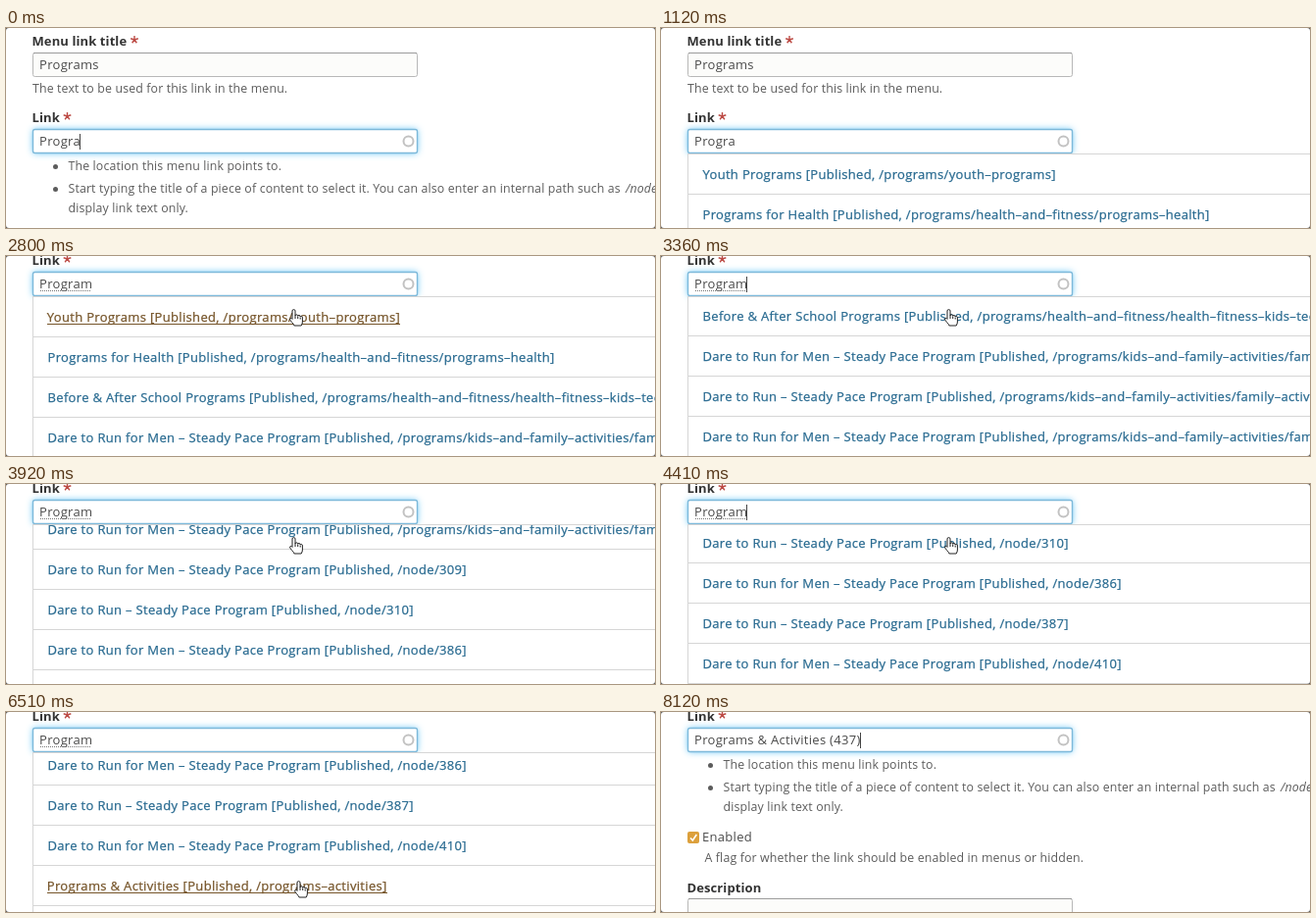
Recreate the animation shown at these times as an HTML page with a canvas. Size 662 px wide and 204 px high, loop 8260 ms.

```html
<!DOCTYPE html>
<html lang="en">
<head>
<meta charset="utf-8">
<title>Menu link form</title>
<style>
html, body { margin: 0; width: 100%; height: 100%; overflow: hidden; background: #fff; }
canvas { display: block; width: 662px; height: 204px; }
</style>
</head>
<body>
<canvas id="stage" width="662" height="204"></canvas>
<script>
const W = 662, H = 204, LOOP = 8260, TICK = 70;
const ctx = document.getElementById('stage').getContext('2d');

const FAMILY = '"Open Sans", "Noto Sans", sans-serif';
const STYLES = {
  label: { font: `bold 13px ${FAMILY}`, gap: 0.1, color: '#333' },
  body: { font: `13px ${FAMILY}`, gap: 0.3, color: '#4a4a4a' },
  link: { font: `13px ${FAMILY}`, gap: 0.33, color: '#286a90', bolder: 0.25 },
  hover: { font: `13px ${FAMILY}`, gap: 0.33, color: '#76552a', bolder: 0.25 },
  help: { font: `12.35px ${FAMILY}`, gap: 0.14, color: '#5c5c5c' },
  path: { font: `italic 12.35px ${FAMILY}`, gap: 0.14, color: '#5c5c5c' }
};
const LINE = '#d6d6d6';

const ROW = 41, LIST_TOP = 128;
const MEN = 'Dare to Run for Men - Steady Pace Program';
const ALL = 'Dare to Run - Steady Pace Program';
const KIDS = '/programs/kids-and-family-activities/family-activities';
const ROWS = [
  ['Youth Programs', '/programs/youth-programs'],
  ['Programs for Health', '/programs/health-and-fitness/programs-health'],
  ['Before & After School Programs', '/programs/health-and-fitness/health-fitness-kids-teens'],
  [MEN, KIDS], [ALL, KIDS], [MEN, KIDS],
  [MEN, '/node/309'], [ALL, '/node/310'],
  [MEN, '/node/386'], [ALL, '/node/387'], [MEN, '/node/410'],
  ['Programs & Activities', '/programs-activities']
].map(([title, path]) => `${title} [Published, ${path}]`);

// Timeline
const EDITS = [[-1, 'Progra'], [1610, 'Program'], [6579, 'Programs & Activities (437)']];
const LIST_OPEN = 490, SELECT = 6580, SPELLCHECK = 1890;
const PAGE_SCROLL = [[1820, 0], [1960, 8], [2100, 26], [2240, 54], [2380, 76], [2520, 87]];
const LIST_SCROLL = [[2940, 0], [3080, 12], [3220, 46], [3360, 83], [3640, 161], [3920, 221],
  [4200, 263], [4480, 297], [4760, 323], [4970, 334], [5180, 336]];
const MOUSE_X = [[2100, 299], [2520, 293], [5600, 293], [6370, 299], [6860, 297]];
const MOUSE_Y = [[2100, 35], [2520, 55], [5600, 55], [6370, 172], [6580, 174], [6860, 187]];

const HAND = new Path2D('M3 10V2Q3 .6 4.5 .6T6 2V7Q6 5.8 7.3 5.8T8.7 7.2Q8.8 6.4 10 6.5T11.2 8' +
  'Q11.4 7.2 12.4 7.4T13.4 9V13Q13.4 15 12.2 17H5Q4.4 15.4 2.6 13.6L.8 11.2Q.2 9.8 1.2 9.4T3 10.4Z');
const KNUCKLES = new Path2D('M6 7V10M8.7 7.5V10M11.2 8.5V10.5');
const ARROW = new Path2D('M0 0V14L3.5 11 6 16.5 8.3 15.5 6 10.2H10.5Z');
const BEAM = new Path2D('M-3.5-7Q0-7 0-5Q0-7 3.5-7M0-5V5.5M-3.5 7.5Q0 7.5 0 5.5Q0 7.5 3.5 7.5');
const CHECK = new Path2D('M30 215.5L32.3 218L36.3 212');

function track(points, t) {
  if (t <= points[0][0]) return points[0][1];
  for (let i = 1; i < points.length; i++) {
    const [t0, a] = points[i - 1], [t1, b] = points[i];
    if (t <= t1) return Math.round(a + (b - a) * (t - t0) / (t1 - t0));
  }
  return points[points.length - 1][1];
}

// Draws text with wide hyphens and returns its width.
function text(str, x, y, name) {
  const wide = str.replace(/-/g, '–');
  const { font, gap, color, bolder } = STYLES[name];
  ctx.font = font;
  ctx.letterSpacing = gap + 'px';
  ctx.fillStyle = color;
  ctx.fillText(wide, x, y);
  if (bolder) {
    ctx.strokeStyle = color;
    ctx.lineWidth = bolder;
    ctx.strokeText(wide, x, y);
  }
  return ctx.measureText(wide).width;
}

function rect(x, y, w, h, color) {
  ctx.fillStyle = color;
  ctx.fillRect(x, y, w, h);
}

function dot(x, y, r, color) {
  ctx.fillStyle = color;
  ctx.beginPath();
  ctx.arc(x, y, r, 0, 7);
  ctx.fill();
}

function star(x, y) {
  ctx.strokeStyle = '#bc4a44';
  ctx.lineWidth = 1.4;
  ctx.beginPath();
  for (let i = 0; i < 5; i++) {
    const a = -Math.PI / 2 + i * Math.PI * 0.4;
    ctx.moveTo(x, y);
    ctx.lineTo(x + 4 * Math.cos(a), y + 4 * Math.sin(a));
  }
  ctx.stroke();
}

function box(y, focused) {
  ctx.save();
  ctx.beginPath();
  ctx.roundRect(27.5, y + 0.5, 392, 24, 2);
  if (focused) {
    ctx.shadowColor = 'rgba(80,190,245,.9)';
    ctx.shadowBlur = 7;
  }
  ctx.fillStyle = focused ? '#fff' : '#fcfcfa';
  ctx.fill();
  ctx.shadowBlur = 0;
  ctx.lineWidth = focused ? 1.4 : 1;
  ctx.strokeStyle = focused ? '#7db9da' : '#b8b8b8';
  ctx.stroke();
  ctx.restore();
  if (!focused) rect(28, y, 391, 1, '#9c9c9c');
}

function caretOn(age) {
  return age < 840 || Math.floor((age - 840) / 490.2) % 2 === 1;
}

function drawField(t) {
  const [since, value] = EDITS.filter(e => e[0] <= t).pop();
  box(103, true);
  const w = text(value, 34, 120, 'body');
  if (value === 'Program' && t >= SPELLCHECK) {
    for (let x = 35; x < 87; x += 2) rect(x, 122, 1, 1, '#777');
  }
  if (caretOn(t - since)) rect(Math.floor(33.5 + w), 108, 1, 16, '#444');
  ctx.strokeStyle = '#c2c2c2';
  ctx.lineWidth = 2;
  ctx.beginPath();
  ctx.arc(410.5, 115.5, 5, 0, 7);
  ctx.stroke();
}

function drawForm(t) {
  text('Menu link title', 26.5, 18, 'label');
  star(131, 12);
  box(25, false);
  text('Programs', 34, 42, 'body');
  text('The text to be used for this link in the menu.', 27, 66, 'help');
  text('Link', 26.5, 96, 'label');
  star(62.5, 90);
  drawField(t);

  dot(50.5, 141.5, 2.5, '#5c5c5c');
  text('The location this menu link points to.', 63.5, 145, 'help');
  dot(50.5, 164.5, 2.5, '#5c5c5c');
  text('Start typing the title of a piece of content to select it. You can also enter an internal path such as', 63.5, 168, 'help');
  text('/node/add', 632, 168, 'path');
  text('display link text only.', 63.5, 188, 'help');

  ctx.fillStyle = '#dca03c';
  ctx.beginPath();
  ctx.roundRect(27, 209, 12, 12, 2);
  ctx.fill();
  ctx.strokeStyle = '#fff';
  ctx.lineWidth = 1.6;
  ctx.stroke(CHECK);
  text('Enabled', 42, 219, 'body');
  text('A flag for whether the link should be enabled in menus or hidden.', 44.5, 240, 'help');
  text('Description', 26.5, 271, 'label');
  box(277, false);
}

function drawList(scroll, hovered) {
  rect(27, LIST_TOP, W, H, '#fff');
  ctx.save();
  ctx.beginPath();
  ctx.rect(27, LIST_TOP, W, H);
  ctx.clip();
  for (let i = 0; i <= ROWS.length; i++) {
    const y = LIST_TOP + i * ROW - scroll;
    if (i) rect(27, y, W, 1, LINE);
    if (i === ROWS.length) break;
    const on = i === hovered, x = on ? 41.8 : 42.5;
    const w = text(ROWS[i], x, y + 26, on ? 'hover' : 'link');
    if (on) rect(42, y + 28, Math.round(w), 1, STYLES.hover.color);
  }
  ctx.restore();
  rect(27, LIST_TOP, W, 1, LINE);
  rect(27, LIST_TOP, 1, H, LINE);
}

function drawPointer(x, y, kind) {
  ctx.save();
  ctx.lineJoin = 'round';
  if (kind === 'beam') {
    ctx.translate(x + 0.5, y + 0.5);
    ctx.strokeStyle = '#fff';
    ctx.lineWidth = 3;
    ctx.stroke(BEAM);
    ctx.strokeStyle = '#111';
    ctx.lineWidth = 1.2;
    ctx.stroke(BEAM);
  } else if (kind === 'hand') {
    ctx.translate(x - 4, y - 1);
    ctx.fillStyle = '#fff';
    ctx.fill(HAND);
    ctx.strokeStyle = '#222';
    ctx.lineWidth = 1;
    ctx.stroke(HAND);
    ctx.stroke(KNUCKLES);
  } else {
    ctx.translate(x, y);
    ctx.strokeStyle = '#fff';
    ctx.lineWidth = 2;
    ctx.stroke(ARROW);
    ctx.fillStyle = '#111';
    ctx.fill(ARROW);
  }
  ctx.restore();
}

function drawCorners() {
  ctx.fillStyle = '#555';
  ctx.beginPath();
  ctx.rect(0, 0, W, H);
  ctx.roundRect(0, 0, W, H, 3);
  ctx.fill('evenodd');
}

function draw(t) {
  const page = track(PAGE_SCROLL, t), scroll = track(LIST_SCROLL, t);
  const x = track(MOUSE_X, t), y = track(MOUSE_Y, t);
  const open = t >= LIST_OPEN && t < SELECT;
  const top = LIST_TOP - page;
  const resting = (t >= 2590 && t < 2940) || t >= 5600;
  const hovered = resting ? Math.floor((y - top + scroll) / ROW) : -1;

  rect(0, 0, W, H, '#fff');
  ctx.save();
  ctx.translate(0, -page);
  drawForm(t);
  if (open) drawList(scroll, hovered);
  ctx.restore();

  if (t >= 1820 && t < 7140) {
    drawPointer(x, y, t >= SELECT ? 'arrow' : y > top ? 'hand' : 'beam');
  }
  drawCorners();
}

const start = performance.now();
function loop() {
  const t = (performance.now() - start) % LOOP;
  draw(Math.floor(t / TICK) * TICK);
  requestAnimationFrame(loop);
}
loop();
</script>
</body>
</html>
```
